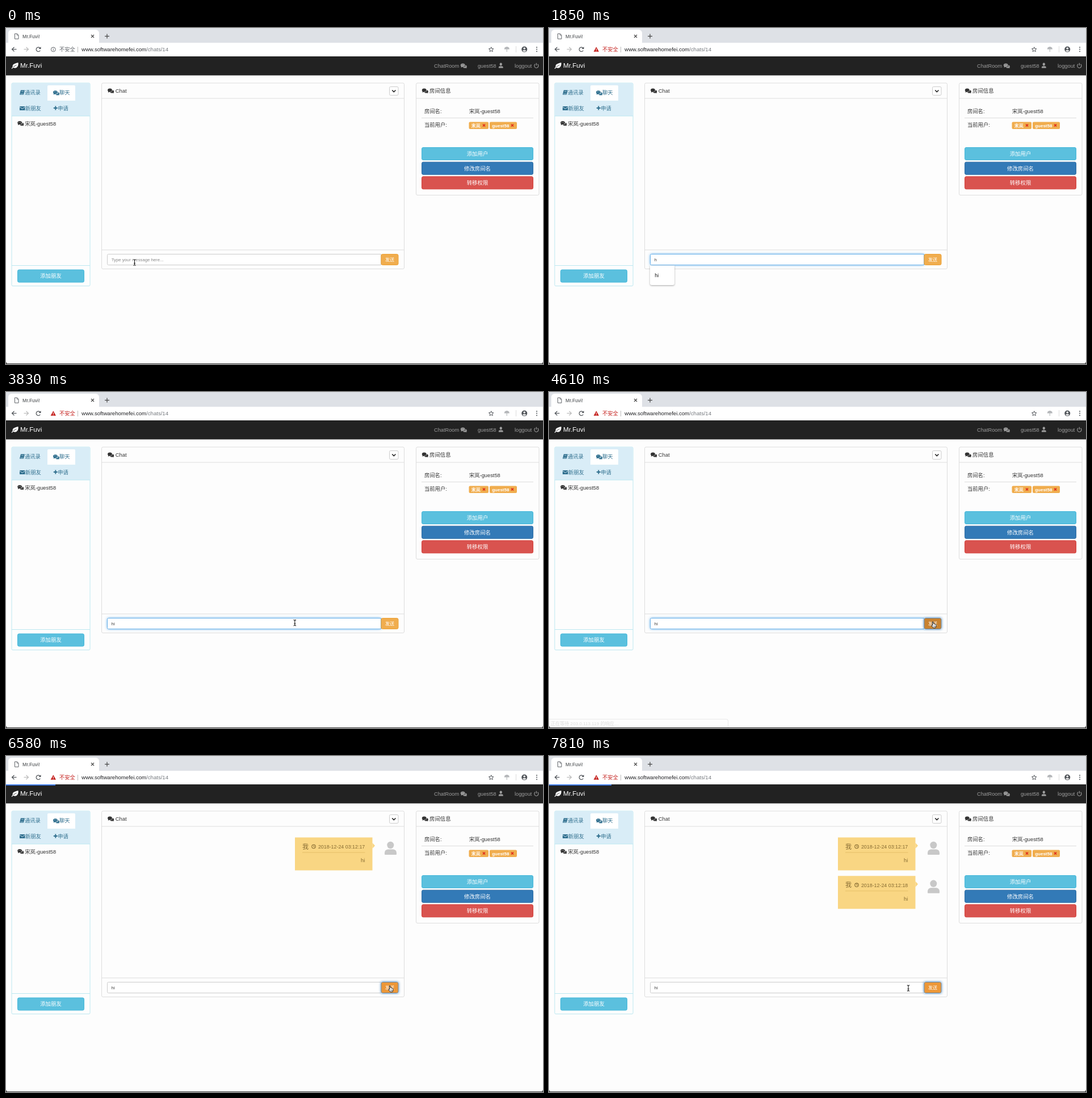
Animation, 946 px wide and 592 px high, one loop 8 s. Source, as an HTML page with a canvas:

```html
<!DOCTYPE html>
<html lang="zh-CN">
<head>
<meta charset="utf-8">
<title>Mr.Fuvi!</title>
<style>
html, body { margin: 0; width: 100%; height: 100%; overflow: hidden; background: #fdfdfd; }
canvas { display: block; width: 946px; height: 592px; }
</style>
</head>
<body>
<canvas id="stage" width="946" height="592"></canvas>
<script>
const g = document.getElementById('stage').getContext('2d');
const FONT = '"Liberation Sans", "Noto Sans CJK SC", "Noto Sans CJK", sans-serif';
const LOOP = 8000, NAME = '宋岚', USER = 'guest58', ROOM = NAME + '-' + USER;
const clamp = v => Math.max(0, Math.min(1, v));
const ramp = (t, a, b) => clamp((t - a) / (b - a));
const ease = p => p * p * (3 - 2 * p);

function text(s, x, y, size, color, align = 'left', weight = 'normal') {
  g.font = `${weight} ${size}px ${FONT}`;
  g.textAlign = align;
  g.fillStyle = color;
  g.fillText(s, x, y);
}
function rect(x, y, w, h, color) {
  g.fillStyle = color;
  g.fillRect(x, y, w, h);
}
function box(x, y, w, h, r, fill, stroke) {
  g.beginPath();
  g.roundRect(x, y, w, h, r);
  if (fill) { g.fillStyle = fill; g.fill(); }
  if (stroke) { g.strokeStyle = stroke; g.lineWidth = 1; g.stroke(); }
}
function oval(x, y, rx, ry, color) {
  g.beginPath();
  g.ellipse(x, y, rx, ry, 0, 0, 7);
  g.fillStyle = color;
  g.fill();
}
function ring(x, y, r, color, w = 1, a = 0, b = Math.PI * 2) {
  g.beginPath();
  g.arc(x, y, r, a, b);
  g.strokeStyle = color;
  g.lineWidth = w;
  g.stroke();
}
function path(points, color, w = 1) {
  g.beginPath();
  for (let i = 0; i < points.length; i += 2) g.lineTo(points[i], points[i + 1]);
  g.strokeStyle = color;
  g.lineWidth = w;
  g.stroke();
}
function poly(points, color) {
  g.beginPath();
  for (let i = 0; i < points.length; i += 2) g.lineTo(points[i], points[i + 1]);
  g.fillStyle = color;
  g.fill();
}
function cross(x, y, r, color, w) {
  path([x - r, y - r, x + r, y + r], color, w);
  path([x - r, y + r, x + r, y - r], color, w);
}
function plus(x, y, r, color, w) {
  path([x - r, y, x + r, y], color, w);
  path([x, y - r, x, y + r], color, w);
}
function glow(x, y, w, h, blur, color) {
  g.save();
  g.shadowColor = color;
  g.shadowBlur = blur;
  box(x, y, w, h, 2, '#fff');
  g.restore();
}

// Two overlapping speech balloons
function balloons(x, y, color, gap) {
  oval(x + 2.3, y + 1.4, 3.5, 2.7, color);
  poly([x + 3, y + 3, x + 5.4, y + 4.8, x + 5, y + 1], color);
  oval(x - 1.3, y - 1, 4.6, 3.7, gap);
  oval(x - 1.3, y - 1, 3.9, 3.1, color);
  poly([x - 4, y, x - 4.5, y + 3.3, x - 1, y + 1.5], color);
}
function chats(x, y, color, gap) {
  balloons(x, y, color, gap);
  for (const [dx, dy] of [[-2.7, -1.8], [0, -1.8], [1.4, .9], [3.6, .9]]) oval(x + dx, y + dy, .5, .5, gap);
}
function person(x, y, k, color) {
  oval(x, y - 2.2 * k, 2.2 * k, 2.6 * k, color);
  box(x - 4 * k, y + 1.2 * k, 8 * k, 3.2 * k, [2.4 * k, 2.4 * k, .3, .3], color);
}
function button(x, y, w, h, label, fill, stroke, size = 9.4) {
  box(x + .5, y + .5, w - 1, h - 1, 2.5, fill, stroke);
  text(label, x + w / 2, y + h / 2 + 3.4, size, '#fff', 'center');
}

function browser(unsafe) {
  const ink = '#5f6368';
  rect(0, 0, 946, 27, '#dee1e6');
  box(4, 3, 160, 28, 6, '#fff');
  rect(0, 26, 946, 24, '#fff');
  path([15.5, 10, 19.5, 10, 22, 12.5, 22, 19.2, 15.5, 19.2, 15.5, 10], ink);
  path([19.3, 10, 19.3, 12.8, 22, 12.8], ink, .8);
  text('Mr.Fuvi!', 29, 17.5, 8.6, '#3c4043');
  cross(152.5, 14.5, 2.5, '#444', 1.1);
  plus(178, 14.5, 4, '#444', 1.2);

  for (const [x, d, c] of [[14.5, -1, '#505459'], [35.5, 1, '#bbb']]) {
    path([x - 4, 37.5, x + 4, 37.5], c, 1.2);
    path([x, 33.7, x + 4 * d, 37.5, x, 41.3], c, 1.2);
  }
  ring(57, 37.7, 3.8, '#505459', 1.2, .5, 5.5);
  poly([61.5, 33, 61.5, 37, 57.5, 37], '#505459');
  const warn = unsafe ? '#c5221f' : ink;
  if (unsafe) {
    poly([83.3, 33.2, 88, 41.8, 78.6, 41.8], warn);
    rect(82.8, 36.3, 1, 2.8, '#fff');
    rect(82.8, 39.8, 1, 1, '#fff');
  } else {
    ring(83.3, 37.8, 3.9, ink);
    rect(82.8, 37.2, 1, 2.8, ink);
    rect(82.8, 35.4, 1, 1, ink);
  }
  text('不安全', 94, 41, 9.3, warn);
  rect(126, 33, 1, 10, '#bbb');
  const host = 'www.softwarehomefei.com';
  text(host, 133, 41, 9.6, '#202124');
  const hostWidth = g.measureText(host).width;
  text('/chats/14', 133 + hostWidth, 41, 9.6, '#75797e');

  const star = [];
  for (let i = 0; i <= 10; i++) {
    const r = i % 2 ? 2 : 4.4, a = i * Math.PI / 5 - Math.PI / 2;
    star.push(854.7 + r * Math.cos(a), 38 + r * Math.sin(a));
  }
  path(star, '#505459', 1);
  g.beginPath();
  g.arc(882.3, 37.5, 4.6, Math.PI, 0);
  g.fillStyle = '#b5b7ba';
  g.fill();
  path([882.3, 37, 882.3, 42], '#b5b7ba', 1.1);
  rect(898, 32, 1, 11, '#ddd');
  oval(913.2, 37.6, 5, 5, '#505459');
  oval(913.2, 36, 1.8, 1.8, '#fff');
  oval(913.2, 40.3, 3, 1.2, '#fff');
  for (const y of [34, 37.6, 41.2]) oval(935, y, 1, 1, '#505459');
}

function navbar(bar) {
  rect(0, 50, 946, 33.5, '#222');
  if (bar > 0) rect(0, 50, bar, 2, '#3b78e7');
  g.beginPath();
  g.moveTo(21.5, 61);
  g.bezierCurveTo(22.5, 68, 18, 72.5, 12, 69.8);
  g.bezierCurveTo(10, 64, 15, 62.5, 21.5, 61);
  g.fillStyle = '#fff';
  g.fill();
  path([10, 71.5, 13, 68.5, 18.5, 65], '#fff', 1.1);
  path([13, 68.5, 18.5, 65], '#222', .8);
  text('Mr.Fuvi', 25, 70.2, 11.7, '#fff');
  const c = '#9d9d9d';
  text('ChatRoom', 754, 69.8, 9.25, c);
  chats(806, 66.5, c, '#222');
  text(USER, 831, 69.8, 9.2, c);
  person(871.8, 66, 1, c);
  text('loggout', 896, 69.8, 9.25, c);
  ring(934.3, 66.6, 3.6, c, 1.1, -.9, Math.PI + .9);
  path([934.3, 61.8, 934.3, 66], c, 1.2);
}

function friends() {
  const c = '#31708f', bg = '#d9edf7', line = '#bce8f1';
  box(10, 97, 138, 357.5, 2, '#fdfdfd', line);
  rect(10.5, 97, 137, 58, bg);
  rect(10, 154.5, 138, 1, line);
  box(73, 101, 49, 27, [2, 2, 0, 0], '#fff');
  poly([26, 109.5, 33, 109.5, 31, 117.5, 24, 117.5], c);
  path([27, 112, 31, 112], bg, .7);
  path([25.5, 116, 30.5, 116], bg, .7);
  text('通讯录', 33, 117.4, 9.3, c);
  chats(88.2, 114.3, c, '#fff');
  text('聊天', 94, 117.4, 9.3, c);
  rect(24, 138, 9.5, 7, c);
  path([24, 139, 28.7, 142.4, 33.5, 139], bg, .9);
  text('新朋友', 34, 144.7, 9.3, c);
  plus(87.3, 141, 3.5, c, 2);
  text('申请', 91.3, 144.7, 9.3, c);
  chats(25.5, 168, '#333', '#fdfdfd');
  text(ROOM, 33.3, 171.5, 9.3, '#333');
  rect(10, 418, 138, 1, line);
  button(20, 425.5, 118, 23, '添加朋友', '#5bc0de', '#46b8da');
}

function roomInfo() {
  box(722.5, 97, 216.5, 197.5, 2.5, '#fdfdfd', '#ddd');
  rect(722.5, 123.5, 216.5, 1, '#ddd');
  balloons(738, 110.5, '#333', '#fdfdfd');
  text('房间信息', 746, 113.6, 9.4, '#333');
  text('房间名:', 737, 149.6, 9.3, '#333');
  text(ROOM, 816, 149.6, 9.3, '#333');
  rect(732, 158, 197, 1, '#ddd');
  text('当前用户:', 737, 174.4, 9.3, '#333');
  for (const [x, w, s] of [[815.5, 34.5, NAME], [852, 48, USER]]) {
    box(x, 165.5, w, 12.5, 2, '#f0ad4e');
    text(s, x + 4.2, 174.5, 8, '#fff', 'left', 'bold');
    cross(x + w - 8, 171.5, 2, '#e0301e', 1.7);
  }
  button(732, 210, 197, 23, '添加用户', '#5bc0de', '#46b8da');
  button(732, 235.7, 197, 23, '修改房间名', '#337ab7', '#2e6da4');
  button(732, 261.3, 197, 23, '转移权限', '#d9534f', '#d43f3a');
}

function message(y, time, fresh) {
  const ink = '#866b32';
  rect(509, y, 136.5, 58, '#f9d683');
  poly([645.5, y + 9.5, 650, y + 14.5, 645.5, y + 19.5], '#f9d683');
  text('我', 522, y + 20, 11, ink);
  ring(542, y + 16, 3.2, ink, 1.1);
  path([542, y + 14, 542, y + 16.4, 543.8, y + 16.4], ink, .9);
  text('2018-12-24 ' + time, 632.3, y + 19.4, 8.9, ink, 'right');
  rect(522, y + 26, 110.5, 1, '#e6bf69');
  text('hi', 632.3, y + 43.5, 9.3, ink, 'right');
  if (fresh) rect(662, y, 29.5, 30.5, '#f2f2f2');
  oval(677.3, y + 13.5, 6, 6.2, '#c8c8c8');
  box(667, y + 21, 21, 9.5, [6, 6, 1, 1], '#c8c8c8');
}

function chat(s) {
  box(168.5, 97, 533, 327.5, 2.5, '#fdfdfd', '#ddd');
  if (s.fresh) {
    rect(169, 97.5, 532, 26, '#f5f5f5');
    rect(169, 391, 532, 7, '#f5f5f5');
  }
  rect(168.5, 123.5, 533, 1, '#ddd');
  rect(168.5, 390.5, 533, 1, '#ddd');
  balloons(184.3, 110.5, '#333', '#fdfdfd');
  text('Chat', 192.7, 113.7, 9.4, '#333');
  box(675.5, 103.5, 15.5, 15, 2, '#fff', '#ccc');
  path([680.2, 109.5, 683.3, 112.6, 686.4, 109.5], '#222', 1.5);
  if (s.sent > 0) message(143.5, '03:12:17', s.fresh);
  if (s.sent > 1) message(211.3, '03:12:18', false);

  if (s.focus) glow(178.5, 398.5, 482, 19, 5, '#66afe9');
  box(178.5, 398.5, 482, 19, [2, 0, 0, 2], '#fff', s.focus ? '#66afe9' : '#ccc');
  if (s.typed) text(s.typed, 185.5, 410.8, 8, '#444');
  else text('Type your message here...', 185.7, 410.8, 7.75, '#888');
  if (s.caret) rect(186, 403, 1, 10, '#333');

  if (s.ring) glow(660.5, 398, 31, 20, 4, '#3f84c4');
  button(660.5, 398, 31, 20, '发送', s.press ? '#c9822f' : s.ring ? '#ec9738' : '#f0ad4e', s.ring ? '#6b87a0' : '#eea236', 8);
}

function suggestions(items, w, h) {
  g.save();
  g.shadowColor = 'rgba(0,0,0,.35)';
  g.shadowBlur = 3;
  g.shadowOffsetY = 1;
  box(178, 418.5, w, h, [0, 0, 3, 3], '#fff');
  g.restore();
  items.forEach((s, i) => text(s, 186.3, 438.8 + i * 23.8, 8.77, '#111'));
}

function beam(x, y) {
  for (const [c, w] of [['#fff', 2.6], ['#222', 1.1]]) {
    path([x - 2.2, y - 5.3, x, y - 4.4, x + 2.2, y - 5.3], c, w);
    path([x - 2.2, y + 5.3, x, y + 4.4, x + 2.2, y + 5.3], c, w);
    path([x, y - 4.4, x, y + 4.4], c, w);
    path([x - 1.5, y + 1.5, x + 1.5, y + 1.5], c, w);
  }
}
function hand(x, y) {
  g.beginPath();
  const p = [-2.6, -5, -1, -5, -.6, -1.6, 3.6, -.6, 4.2, 1, 3, 5.4, -1.2, 5.4, -4.2, 1.6, -3.6, .5, -2.2, 1.4];
  for (let i = 0; i < p.length; i += 2) g.lineTo(x + p[i], y + p[i + 1]);
  g.closePath();
  g.fillStyle = '#fff';
  g.fill();
  g.strokeStyle = '#222';
  g.lineWidth = 1;
  g.stroke();
  path([x - .1, y + 1.5, x - .1, y + 4], '#222', .7);
  path([x + 1.7, y + 1.5, x + 1.7, y + 4], '#222', .7);
}

function pointer(t) {
  if (t < 140) return beam(226.5, 413);
  if (t < 1700) return beam(225, 402);
  if (t < 3240) return;
  let x = 225 + 453 * ease(ramp(t, 3240, 4250));
  let y = 402 + 8 * ramp(t, 3240, 4250);
  const back = ease(ramp(t, 7250, 7750));
  x -= 45 * back;
  y -= back;
  (x > 660 ? hand : beam)(x, y);
}

// Progress line: quick start, slow trickle, then a dash to full width
function progress(t) {
  const run = u => 87 * ease(ramp(u, 0, 300)) + 23 * ramp(u, 330, 1130);
  if (t < 4650 || t >= 6070 && t < 6250) return 0;
  if (t < 5910) return run(t - 4650);
  if (t < 6070) return 110 + 836 * ramp(t, 5910, 6020);
  return run(t - 6250);
}

function status(alpha) {
  if (alpha <= 0) return;
  g.save();
  g.globalAlpha = alpha;
  box(-1, 576.5, 316.5, 16, [0, 3, 0, 0], '#f8f8f8', '#999');
  text('正在等待 203.0.113.119 的响应…', 3, 587, 8.1, '#555');
  g.restore();
}

function draw(t) {
  rect(0, 0, 946, 592, '#fdfdfd');
  browser(t >= 1700);
  navbar(progress(t));
  friends();
  roomInfo();
  chat({
    focus: t >= 430 && t < 4760,
    typed: t < 1700 ? '' : t < 1950 ? 'h' : 'hi',
    caret: t >= 430 && t < 910 || t >= 1360 && t < 1700,
    ring: t >= 4450,
    press: t >= 4450 && t < 4760,
    sent: t < 5630 ? 0 : t < 7500 ? 1 : 2,
    fresh: t >= 5630 && t < 5910
  });
  if (t >= 430 && t < 1700)
    suggestions(['hi', '今天机器学习的作业做完了吗', '厉害了', '急性肝炎 是什么', 'K72 是什么', 'K72是什么'], 150.5, 153);
  else if (t >= 1700 && t < 3240) suggestions(['hi'], 43, 34.5);
  status(.2 * ramp(t, 4400, 4560) * (1 - ramp(t, 4760, 4900)));
  pointer(t);

  rect(0, 591, 946, 1, '#3a3a3a');
  poly([0, 588, 1, 590.3, 3.5, 592, 0, 592], '#3a3a3a');
  poly([946, 588, 945, 590.3, 942.5, 592, 946, 592], '#3a3a3a');
}

const start = performance.now();
function tick() {
  draw((performance.now() - start) % LOOP);
  requestAnimationFrame(tick);
}
tick();
</script>
</body>
</html>
```
